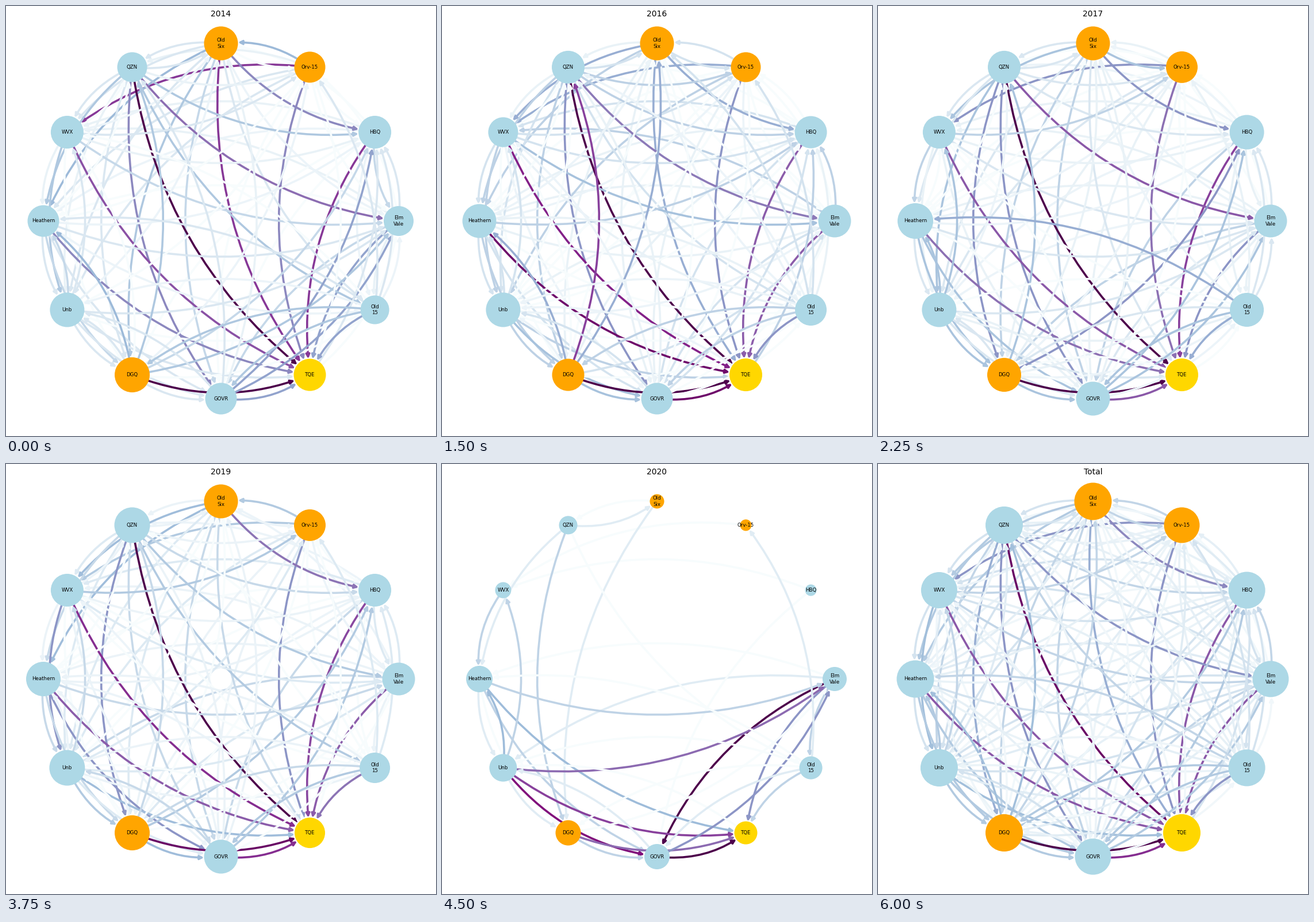
Animation, 748 px wide and 748 px high, one loop 6750 ms. Source, as a matplotlib script:

```python
import random
import numpy as np
import matplotlib.pyplot as plt
from matplotlib.animation import FuncAnimation
from matplotlib.patches import Circle, FancyArrowPatch

SIZE, DPI = 748, 100
CENTER, RING = 374, 309
PT = 72 / DPI
CMAP = plt.get_cmap("BuPu")

# Groups A..L sit counter-clockwise on the ring, starting at the right.
KEYS = "ABCDEFGHIJKL"
LABELS = ["Elm\nVale", "HBQ", "Orv-15", "Old\nSix", "QZN", "WVX",
          "Heathern", "Unb", "DGQ", "GOVR", "TQE", "Old\n15"]
FILL = {"C": "orange", "D": "orange", "I": "orange", "K": "gold"}
POS = {k: (CENTER + RING * np.cos(np.pi * i / 6),
           CENTER + RING * np.sin(np.pi * i / 6)) for i, k in enumerate(KEYS)}

RADII = {
    "2014": [26, 28.5, 27, 29.5, 26, 28.5, 27.5, 30, 30.5, 27.5, 28, 25],
    "2015": [26, 28.5, 27, 29, 28, 28, 30.5, 30, 29, 29, 28, 27],
    "2016": [28.5, 28, 26, 29.5, 28.5, 26, 29.5, 30, 28, 27.5, 28.5, 27.5],
    "2017": [28.5, 30, 27.5, 29.5, 28.5, 28.5, 31, 30, 29.5, 29.5, 28.5, 29.5],
    "2018": [27.5, 29, 27, 29.5, 30, 28.5, 29.5, 30, 30, 29.5, 28, 28],
    "2019": [28.5, 28.5, 27.5, 29.5, 31, 28.5, 30, 31, 30.5, 29.5, 26.5, 26.5],
    "2020": [21, 10, 10, 12.5, 16, 14, 23, 24, 22, 22, 20, 20],
    "2021": [27, 28, 27, 29, 29.5, 28, 30, 30, 29.5, 29, 27.5, 27],
    "Total": [31.5, 32, 31, 32.5, 32.5, 31.5, 32.5, 32.5, 32.5, 31.5, 32.5, 32],
}

# Share of wins (1 = most) -> winner/loser pairs.
WINS = {
    "2014": {
        1: "EK IK", .77: "CF DK BK", .7: "FK", .62: "EA", .54: "DB CK GK EJ",
        .46: "JB JK LK AK JA", .38: "IG DG CD",
        .31: "EL EB DI IE LI IA EG FH LJ", .23: "FA DJ BA IB GI AJ HG",
        .15: "DE EF DF ED FC GH HI IJ LG HK HJ LC LB AB JE JH IH GJ HF EI "
             "HA DL CG CH GA DH KB",
        .08: "FB BF CE FG AL EC JD AF EH"},
    "2016": {
        1: "EK IK", .92: "GK JK", .83: "FK", .75: "IE", .67: "BK AK",
        .58: "EA", .5: "CK LK EJ", .42: "DB CF DK ID IG DF", .34: "FA IJ HJ",
        .26: "AB EB GB AF EI HI HK LJ KB GI EG DG LI CH FH EC",
        .17: "BF FB FC CD DC HG HF GJ AJ BJ JH EL LC JB IA GH FG ED LD EH",
        .08: "DE EF AH AG GA BG LG DJ DI CJ BI AL LB JE FL"},
    "2017": {
        1: "EK IK", .75: "BK", .68: "FK EA JK", .61: "CK GK",
        .5: "CF DB IB EJ EI AK", .42: "LG LK",
        .33: "IE IJ HI DF GJ HF DC EH JB JA LJ HG GI",
        .25: "FC DJ DI FG BJ AI",
        .15: "FA GA ED HK DE IH GH LA AB DK AJ EC EB DH LB EF EG HJ HA LI CH",
        .08: "FB BF CD AF BA BL LC CI CJ AL AG FH ID JD HL IA JH FJ"},
    "2019": {
        1: "EK", .93: "IK", .8: "FK JK", .73: "BK", .67: "GK AK",
        .6: "DB LK", .5: "CK EI FH GJ", .37: "IJ HK DF DG",
        .3: "CD CF FC EA EL JB IB HI LJ",
        .22: "IE DK EB GA AH DJ EJ BJ HF JH GH EG GI LI",
        .14: "LC AB LB BF AI DI HC FA DH CH EH HA EF HJ BA",
        .07: "FB DE ED AG LG CJ CI AF AL EC FG JE JD HL LH GB"},
    "2020": {
        1: "AJ JK", .875: "HJ", .75: "HK", .625: "HA IK", .5: "AK JA",
        .375: "GK HG", .25: "GA EI FG HF GJ IJ LK AL",
        .125: "ED DI EG GH HI LC AH JH LJ",
        0: "DE CF BF AG LG EL BJ LH LI IA GI KH"},
    "Total": {
        1: "IK", .93: "EK", .8: "JK", .68: "FK GK BK AK", .54: "DB",
        .5: "LK CK EJ EA CF", .42: "DK EI", .36: "FH IE IG HK",
        .3: "IJ HI DF LJ LI GJ GI JB IB DG EG HJ HG JA",
        .24: "FC LG AB EB ID DJ EH CD DI HF FA DC EL AJ",
        .17: "DE EF FG GH ED GA AH HA BF FB AF JH LC BA BJ CH DH AL LB KB"},
}
BLENDS = {"2015": ("2014", "2016"), "2018": ("2017", "2019"),
          "2021": ("2019", "Total")}


def season(year):
    """Weights of all pairs, with faint minor results filled in."""
    rng = random.Random(year)
    w = {pair: v for v, names in WINS[year].items() for pair in names.split()}
    if year == "2020":
        return w
    total = year == "Total"
    for a in KEYS:
        for b in KEYS:
            chance = (.6 if total else .1) if a == "K" else (1 if total else .6)
            if a == b or a + b in w or rng.random() > chance:
                continue
            w[a + b] = rng.uniform(.02, .13) if total else rng.choice([0, 0, .06])
    return w


def blend(p, q):
    both = sorted(set(p) | set(q))
    return {k: (p.get(k, 0) + q.get(k, 0)) / 2 for k in both
            if k in p and k in q or p.get(k, 0) + q.get(k, 0) > .1}


WEIGHTS = {year: season(year) for year in WINS}
for year, (before, after) in BLENDS.items():
    WEIGHTS[year] = blend(WEIGHTS[before], WEIGHTS[after])
YEARS = list(RADII)

fig = plt.figure(figsize=(SIZE / DPI, SIZE / DPI), dpi=DPI, facecolor="white")
ax = fig.add_axes([0, 0, 1, 1])


def draw(i):
    year = YEARS[i]
    radius = dict(zip(KEYS, RADII[year]))
    ax.clear()
    ax.set(xlim=(0, SIZE), ylim=(0, SIZE))
    ax.axis("off")
    for (a, b), w in sorted(WEIGHTS[year].items()):
        ax.add_patch(FancyArrowPatch(
            POS[a], POS[b], arrowstyle="-|>", mutation_scale=10,
            connectionstyle="arc3,rad=0.2", color=CMAP(float(w)), lw=2.6,
            shrinkA=radius[a] * PT, shrinkB=radius[b] * PT, zorder=1))
    for k, label in zip(KEYS, LABELS):
        ax.add_patch(Circle(POS[k], radius[k], lw=0, zorder=2,
                            fc=FILL.get(k, "lightblue")))
        ax.text(*POS[k], label, size=6.2, family="DejaVu Sans",
                ha="center", va="center", zorder=3)
    ax.text(CENTER, SIZE - 18, year, size=10, family="DejaVu Sans",
            ha="center", va="baseline")
    return []


anim = FuncAnimation(fig, draw, frames=len(YEARS), interval=750,
                     init_func=lambda: [], repeat=True, repeat_delay=0)
plt.show()
```
